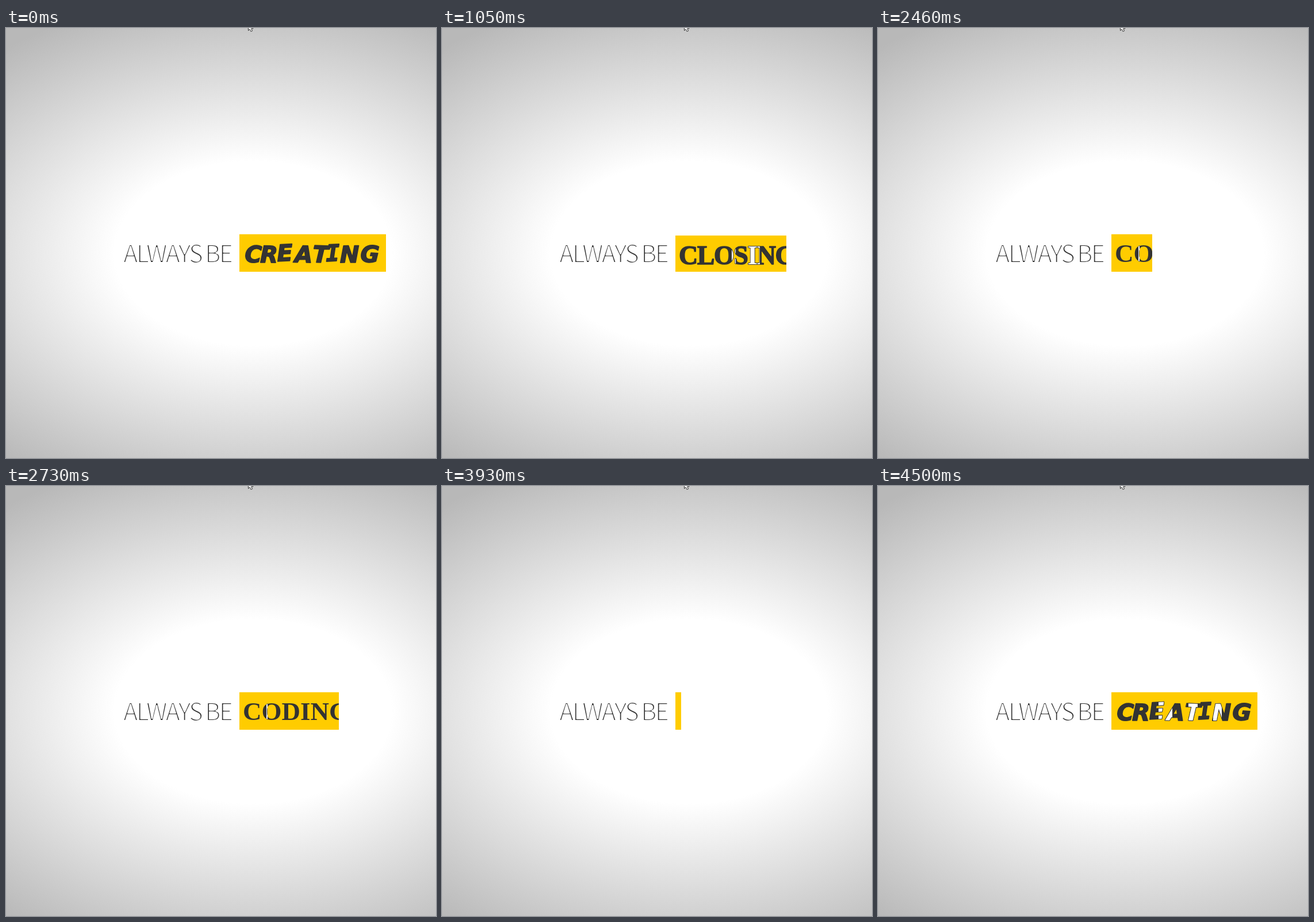
An HTML page with a canvas for the animation above (4590 ms loop, 748 by 748 pixels).

```html
<!DOCTYPE html>
<html lang="en">
<head>
<meta charset="utf-8">
<title>Always be creating</title>
<style>
  html, body { margin: 0; width: 100%; height: 100%; overflow: hidden; }
  body { background: radial-gradient(687px 458px at 430px 392px, #fff 35%, #b8b8b8 100%); }
  canvas { display: block; }
</style>
</head>
<body>
<canvas id="stage" width="748" height="748"></canvas>
<script>
const stage = document.getElementById('stage');
const ctx = stage.getContext('2d');
const LOOP = 4590, TICK = 30;
const LEFT = 406, SLIVER = 7, BOTTOM = 424;
const INK = '#333', YELLOW = '#fc0';

// Times are [start, duration]; gaps are strips where the lettering shows white.
const words = [
  { from: 420, right: 616, top: 361, grow: [710, 430], shrink: [1860, 138],
    gaps: [[504, 7], [533, 20]], draw: paint => serif(paint, 'CLOSING', 46, 411, -1.5, 1.5) },
  { from: 2040, right: 579, top: 358.5, grow: [2330, 380], shrink: [3424, 146],
    gaps: [[453, 2]], draw: paint => serif(paint, 'CODING', 45, 407, 0, 0) },
  { from: 3900, right: 661, top: 358.5, grow: [3920, 590], shrink: [LOOP + 330, 75],
    gaps: [[488, 24], [540, 16], [583, 15]], draw: marker }
];

const clamp = v => Math.min(1, Math.max(0, v));
const progress = (t, [start, duration]) => clamp((t - start) / duration);
const ease = p => ((1 - Math.cos(Math.PI * p)) / 2 + Math.sin(Math.PI * p / 2)) / 2;

function clipped(x, y, w, h, draw) {
  ctx.save();
  ctx.beginPath();
  ctx.rect(x, y, w, h);
  ctx.clip();
  draw();
  ctx.restore();
}

function glyphs(paint, text, x, y, weight) {
  ctx.lineJoin = 'round';
  ctx.strokeStyle = INK;
  ctx.lineWidth = paint === INK ? weight : 1.4;
  if (paint !== INK || weight) ctx.strokeText(text, x, y);
  ctx.fillStyle = paint;
  ctx.fillText(text, x, y);
}

function serif(paint, text, size, y, tracking, weight) {
  ctx.font = `bold ${size}px "Liberation Serif", serif`;
  ctx.letterSpacing = tracking + 'px';
  glyphs(paint, text, 412, y, weight);
}

// Loose marker lettering: every letter leans a little differently.
function marker(paint) {
  const starts = [415, 442, 472, 502, 533, 557, 581, 616];
  ctx.letterSpacing = '0px';
  [...'CREATING'].forEach((letter, i) => {
    const family = letter === 'I' ? 'DejaVu Sans Mono' : 'DejaVu Sans';
    ctx.font = `italic bold 40px "${family}", sans-serif`;
    ctx.save();
    ctx.translate(starts[i], 407 + Math.sin(i * 2.3));
    ctx.rotate(0.05 * Math.sin(i * 1.9 + 1));
    glyphs(paint, letter, 0, 0, 1.8);
    ctx.restore();
  });
}

function layer() {
  const pen = new OffscreenCanvas(stage.width, stage.height).getContext('2d');
  pen.font = '42px "Noto Sans CJK JP", "Noto Sans CJK SC", "Noto Sans CJK KR", Lato, sans-serif';
  pen.letterSpacing = '-3px';
  pen.lineJoin = 'round';
  pen.lineWidth = 2.2;
  pen.fillStyle = INK;
  return pen;
}

// Thin lettering: trim the outline of each regular-weight letter on its own layer.
function thinText(target, text, x, y) {
  const widthOf = s => target.measureText(s).width;
  [...text].forEach((letter, i) => {
    const pen = layer();
    const at = x + widthOf(text.slice(0, i + 1)) - widthOf(letter);
    pen.fillText(letter, at, y);
    pen.globalCompositeOperation = 'destination-out';
    pen.strokeText(letter, at, y);
    target.drawImage(pen.canvas, 0, 0);
  });
}

const title = layer();
thinText(title, 'ALWAYS', 204, 408);
thinText(title, 'BE', 346, 408);

function drawPointer() {
  const arrow = new Path2D('M421.5-9V4.5L424 2L426 6L428.5 5L426.5 1H430Z');
  ctx.fillStyle = '#fff';
  ctx.strokeStyle = INK;
  ctx.lineWidth = 1;
  ctx.fill(arrow);
  ctx.stroke(arrow);
}

function drawWord(t) {
  const { right, top, grow, shrink, gaps, draw } = words.findLast(w => t >= w.from);
  const open = ease(progress(t, grow)) * (1 - progress(t, shrink));
  const width = Math.floor(SLIVER + (right - LEFT - SLIVER) * open);
  clipped(LEFT, top, width, BOTTOM - top, () => {
    ctx.fillStyle = YELLOW;
    ctx.fillRect(LEFT, top, width, BOTTOM - top);
    draw(INK);
    if (t >= LOOP) return;
    for (const [x, w] of gaps) clipped(x, top, w, BOTTOM - top, () => draw('#fff'));
  });
}

function render(now) {
  let t = Math.floor(now % LOOP / TICK) * TICK;
  if (t < words[0].from) t += LOOP;
  ctx.clearRect(0, 0, stage.width, stage.height);
  ctx.drawImage(title.canvas, 0, 0);
  drawWord(t);
  drawPointer();
}

const began = performance.now();
function tick() {
  render(performance.now() - began);
  requestAnimationFrame(tick);
}
tick();
</script>
</body>
</html>
```
